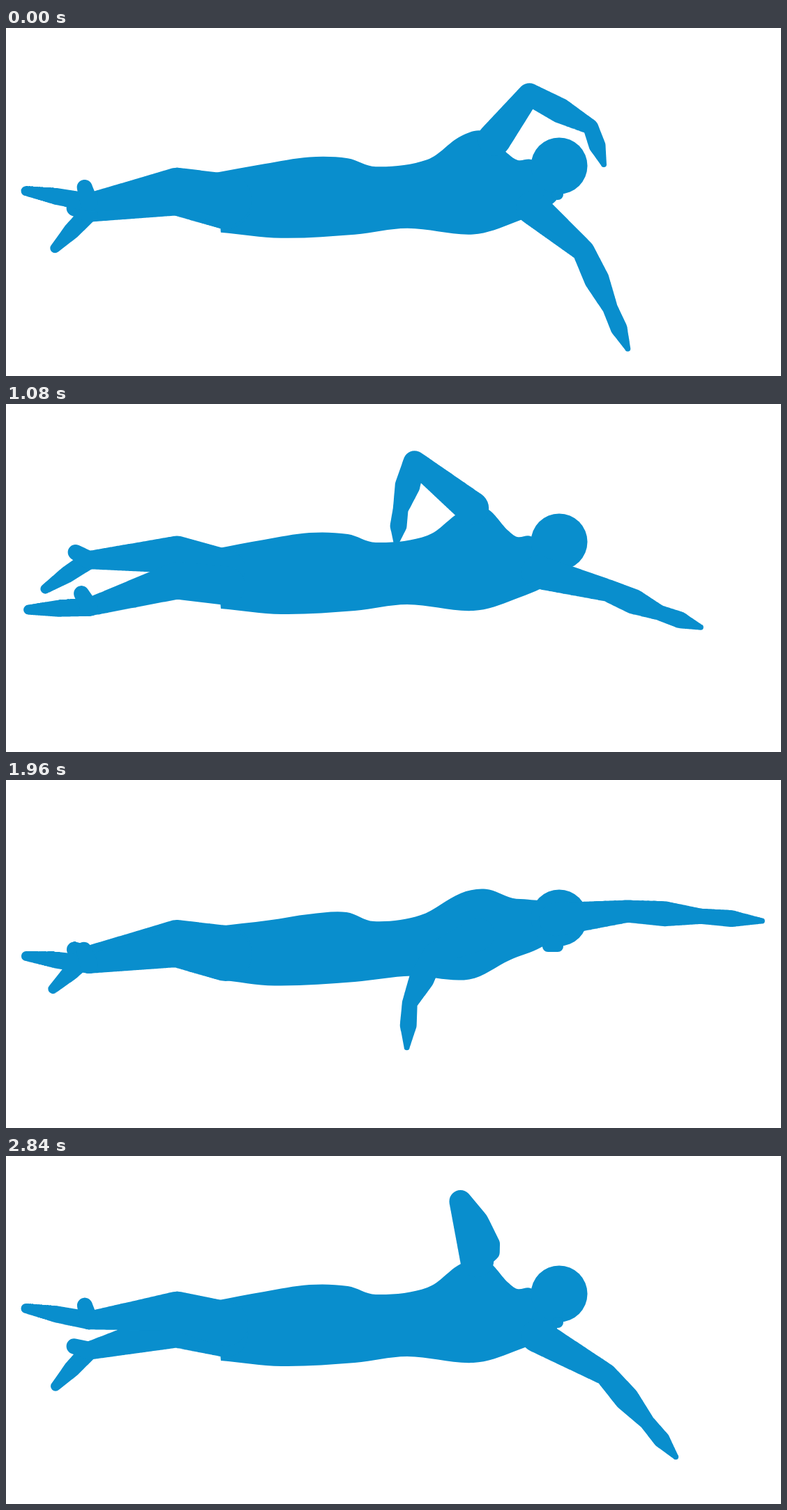
Animation of 1111 by 500 pixels, one loop 2880 ms. Source, as an HTML page with a canvas:

```html
<!DOCTYPE html>
<html lang="en">
<head>
<meta charset="utf-8">
<title>Front crawl</title>
<style>
  html, body { margin: 0; width: 100%; height: 100%; overflow: hidden; background: #fff; }
  canvas { display: block; }
</style>
</head>
<body>
<canvas id="stage" width="1111" height="500"></canvas>
<script>
const LOOP = 2880, STEP = 40;         // playback, ms
const STROKE = 2960, KICK = 960;      // one full arm cycle and one leg beat, ms
const ctx = document.getElementById("stage").getContext("2d");
const numbers = text => text.split(/[ ,]+/).map(Number);
const mix = (a, b, u) => a + (b - a) * u;

// Trunk from back to belly: lying level, and rolled onto the reaching arm.
const level = numbers("300,208 370,195 435,185 490,187 530,199 604,189 652,155 685,148 720,182 733,191 752,190 792,215 788,250 728,281 670,297 575,288 500,297 395,302 308,294");
const rolled = numbers("302,212 382,206 435,198 487,192 525,206 587,198 652,168 690,163 730,161 760,158 800,168 828,205 752,234 718,243 660,279 585,277 500,285 378,291 306,282");

// Arm stroke: shoulder, elbow, wrist and fingertip at each stage.
const stroke = [
  [0, "700,160 750,95 838,142 857,196"],        // hand swings over
  [320, "775,184 855,166 948,185 1017,206"],    // entry
  [700, "770,221 876,217 970,217 1051,213"],    // glide
  [1380, "755,254 843,306 895,370 931,417"],    // catch
  [1480, "749,253 815,309 850,384 873,437"],
  [1800, "688,255 673,310 680,386 679,441"],    // pull
  [2180, "672,174 565,160 490,222 486,293"],    // exit
  [2860, "676,150 656,63 706,124 704,148"]      // elbow high
].map(([time, joints]) => ({ time, joints: numbers(joints) }));

const ARM = [24, 20, 16, 18, 11, 12, 4];        // radii from shoulder to fingertip
const FOOT = [13, 12, 7];

// Key of the endless stroke, with its time unwrapped.
function stage(i) {
  const n = stroke.length, k = stroke[(i + n) % n];
  return { time: k.time + Math.floor(i / n) * STROKE, joints: k.joints };
}

// Cubic Hermite interpolation between uneven keys.
function strokeAt(time) {
  const i = stroke.findLastIndex(k => k.time <= time);
  const [p, a, b, q] = [i - 1, i, i + 1, i + 2].map(stage);
  const span = b.time - a.time, u = (time - a.time) / span;
  const ease = u * u * (3 - 2 * u);
  const leave = u * (1 - u) ** 2 * span / (b.time - p.time);
  const arrive = u * u * (u - 1) * span / (q.time - a.time);
  return a.joints.map((v, n) => mix(v, b.joints[n], ease)
    + (b.joints[n] - p.joints[n]) * leave + (q.joints[n] - v) * arrive);
}

// Value at u (0..1) along an evenly spaced list.
function along(list, u) {
  const x = u * (list.length - 1), i = Math.min(Math.floor(x), list.length - 2);
  return mix(list[i], list[i + 1], x - i);
}

function disc(x, y, r) {
  ctx.moveTo(x + r, y);
  ctx.arc(x, y, r, 0, 2 * Math.PI);
}

// Tapered tube through joints given as x,y pairs.
function limb(joints, radii) {
  const xs = joints.filter((_, n) => n % 2 === 0);
  const ys = joints.filter((_, n) => n % 2 === 1);
  ctx.beginPath();
  for (let i = 0; i <= 200; i++) {
    const u = i / 200;
    disc(along(xs, u), along(ys, u), along(radii, u));
  }
  ctx.fill();
}

// Smooth open curve through the points, closed by a straight line.
function fillOutline(xy) {
  const last = xy.length / 2 - 1;
  const point = i => {
    const n = Math.max(0, Math.min(last, i)) * 2;
    return [xy[n], xy[n + 1]];
  };
  const tangent = i => {
    const [x0, y0] = point(i - 1), [x1, y1] = point(i + 1);
    const size = Math.hypot(x1 - x0, y1 - y0);
    return [(x1 - x0) / size, (y1 - y0) / size];
  };
  ctx.beginPath();
  ctx.moveTo(...point(0));
  for (let i = 0; i < last; i++) {
    const [ax, ay] = point(i), [bx, by] = point(i + 1);
    const [ux, uy] = tangent(i), [vx, vy] = tangent(i + 1);
    const h = Math.hypot(bx - ax, by - ay) / 3;
    ctx.bezierCurveTo(ax + ux * h, ay + uy * h, bx - vx * h, by - vy * h, bx, by);
  }
  ctx.fill();
}

function body(time) {
  const d = Math.min(1, Math.abs(time % (STROKE / 2) - 320) / 360);
  const roll = Math.cos(d * Math.PI / 2) ** 2;
  fillOutline(level.map((v, n) => mix(v, rolled[n], roll)));
  ctx.beginPath();
  disc(793, 198, 40.5);
  ctx.fill();
  limb([791, 239, 791 - 24 * roll, 239], [8, 8]);
}

// reach stretches the arm away from the shoulder line.
function arm(time, reach) {
  const joints = strokeAt(time % STROKE);
  limb(joints.map((v, n) => mix(n % 2 ? 200 : 690, v, reach)), ARM);
}

// The foot trails the beat: toes drop on the way up and lift on the way down.
function leg(phase) {
  const lift = Math.sin(phase), speed = Math.cos(phase), near = 1 - Math.abs(lift);
  const x = 119, y = 258 - 56 * lift;
  limb([315, 249 - 20 * lift, 245, 235 - 31 * lift, x, y],
    [20 + 20 * near, 24 + 7 * near, 13]);
  const tilt = (18 - 10 * lift + 27 * speed) * Math.PI / 180;
  const dx = -Math.cos(tilt), dy = Math.sin(tilt), size = 88 - 22 * tilt;
  limb([x, y, x + dx * size, y + dy * size], FOOT);
  limb([x, y, x + 10 * dx - 20 * dy, y + 10 * dy + 20 * dx], [13, 11]);
}

function draw(now) {
  let time = Math.floor(now % LOOP / STEP) * STEP;
  if (time < 2 * STEP) time = 0;
  ctx.fillStyle = "#fff";
  ctx.fillRect(0, 0, 1111, 500);
  ctx.fillStyle = "#098ecd";
  body(time);
  arm(time, 1);
  arm(time + STROKE / 2, 1.1);
  const beat = 2 * Math.PI * (time - 21) / KICK;
  leg(beat);
  leg(beat + Math.PI);
  requestAnimationFrame(draw);
}
requestAnimationFrame(draw);
</script>
</body>
</html>
```
